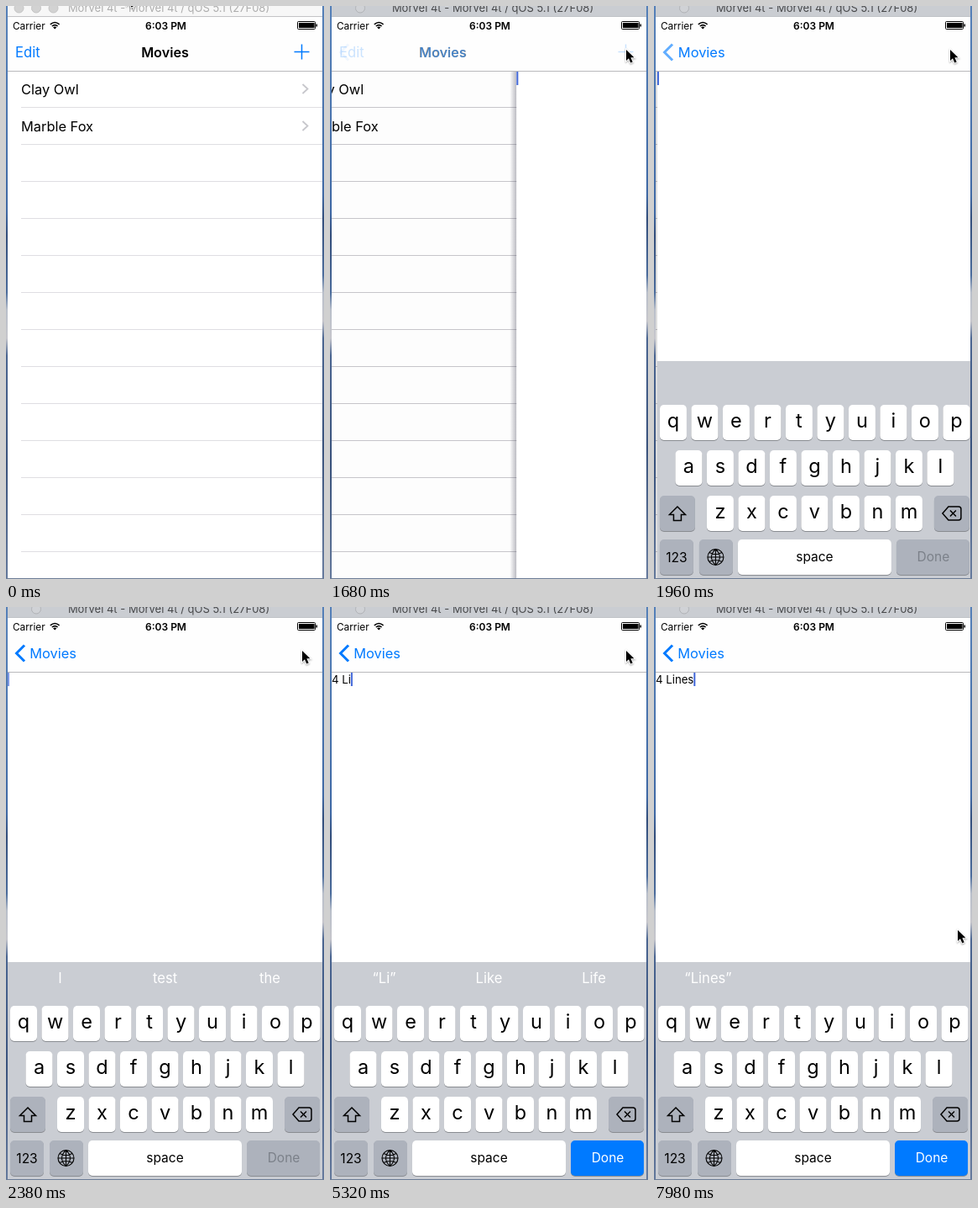
An HTML page with a canvas that plays this animation: 379 by 681 pixels, repeating every 8 s.

```html
<!DOCTYPE html>
<html lang="en">
<head>
<meta charset="utf-8">
<title>Movie list</title>
<style>
  html, body { margin: 0; width: 100%; height: 100%; overflow: hidden; background: #fff; }
  canvas { display: block; }
</style>
</head>
<body>
<canvas id="stage" width="379" height="681"></canvas>
<script>
const ctx = document.getElementById('stage').getContext('2d');
const LOOP = 8000, STEP = 70;
const LEFT = 2, RIGHT = 377, VIEW = RIGHT - LEFT, BOTTOM = 680;
const BLUE = '#007aff', PUSH = 1614, ACTIVATE = 1190;
const FONT = 'Inter, "Liberation Sans", sans-serif';

// [time, x, y] of the pointer; [time, alpha] of the caret
const POINTER = [[140, 143, -15], [560, 268, 58], [840, 350, 106], [1050, 352, 51],
                 [7630, 352, 51], [7980, 361, 383]];
const CARET = [[2310, 1], [2520, 0], [2730, 0], [2940, 1], [3290, 1], [3570, 0], [3780, 0], [3920, 1]];

// [time, text in the field, suggestions]
const TYPING = [
  [2100, '', ['I', 'test', 'the']],
  [3920, '4', ['“4”']],
  [4410, '4 ', ['minutes', 'days', 'hours']],
  [4690, '4 L', ['“L”', 'Let', 'Love']],
  [5110, '4 Li', ['“Li”', 'Like', 'Life']],
  [5530, '4 Lin', ['“Lin”', 'Line', 'Life']],
  [6020, '4 Linr', ['“Linr”']],
  [6300, '4 Linrs', ['“Linrs”']],
  [6860, '4 Linr', ['“Linr”']],
  [7070, '4 Lin', ['“Lin”']],
  [7420, '4 Line', ['“Line”']],
  [7700, '4 Lines', ['“Lines”']]
];

const clamp = v => Math.max(0, Math.min(1, v));

function along(points, t) {
  if (t <= points[0][0]) return points[0].slice(1);
  for (let i = 1; i < points.length; i++) {
    const a = points[i - 1], b = points[i];
    if (t <= b[0]) {
      const k = (t - a[0]) / (b[0] - a[0]);
      return a.slice(1).map((v, j) => v + (b[j + 1] - v) * k);
    }
  }
  return points[points.length - 1].slice(1);
}

function rect(x, y, w, h, color) {
  ctx.fillStyle = color;
  ctx.fillRect(x, y, w, h);
}

function text(str, x, y, size, color, align = 'left', weight = 400) {
  ctx.font = `${weight} ${size}px ${FONT}`;
  ctx.textAlign = align;
  ctx.fillStyle = color;
  ctx.fillText(str, x, y);
}

function stroke(path, color, width) {
  ctx.strokeStyle = color;
  ctx.lineWidth = width;
  ctx.stroke(new Path2D(path));
}

function faded(alpha, draw) {
  ctx.save();
  ctx.globalAlpha *= clamp(alpha);
  draw();
  ctx.restore();
}

function desktop() {
  [[0, 0], [RIGHT, -0.03]].forEach(([x, shift]) => {
    const g = ctx.createLinearGradient(0, 0, 0, 681);
    [[0.03, '#5580b8'], [0.36, '#3f69a5'], [0.4, '#334e7b'], [0.5, '#4b6c9c'], [0.53, '#b9bfca'],
     [0.58, '#c6c6cc'], [0.61, '#4a6591'], [0.8, '#39527c'], [1, '#64799c']]
      .forEach(([at, color]) => g.addColorStop(at + shift, color));
    rect(x, 0, 2, 681, g);
  });
  rect(0, BOTTOM, 379, 1, '#6b7c96');
}

function movieList(t, progress) {
  const active = t >= ACTIVATE;
  ctx.save();
  ctx.translate(-0.3 * VIEW * progress, 0);
  ['Clay Owl', 'Marble Fox'].forEach((name, i) => {
    const y = 105 + 44 * i;
    text(name, 18, y, 16.4, '#000');
    stroke(`M353.5 ${y - 12}l6 5.5l-6 5.5`, '#c7c7cc', 1.8);
  });
  for (let y = 120; y < BOTTOM; y += 44) rect(18, y, 500, 1, active ? '#c8c7cc' : '#dfdee2');
  ctx.restore();
  rect(LEFT, 78, VIEW, BOTTOM - 78, `rgba(0,0,0,${0.13 * progress ** 3})`);
}

function key(x, y, w, fill = '#fff') {
  [['#898c91', 1], [fill, 0]].forEach(([color, dy]) => {
    ctx.fillStyle = color;
    ctx.beginPath();
    ctx.roundRect(x, y + dy, w, 42, 5);
    ctx.fill();
  });
}

function keyboard(t, entry) {
  const GREY = '#adb2bc';
  rect(LEFT, 422, VIEW, BOTTOM - 422, '#cacdd3');
  if (entry) {
    faded((t - entry[0] + STEP) / 210, () => entry[2].forEach((word, i) =>
      text(word, 64.5 + 125 * i, 447, 16.6, '#fff', 'center')));
  }
  [['qwertyuiop', 5, 474], ['asdfghjkl', 23.5, 528], ['zxcvbnm', 61, 582]].forEach(([row, x0, y]) =>
    [...row].forEach((letter, i) => {
      const x = x0 + 37.5 * i;
      key(x, y, 32);
      text(letter, x + 16, y + 27, 23.5, '#000', 'center');
    }));
  key(5, 582, 42, GREY);
  stroke('M26 595l9.5 9.5h-5v7h-9v-7h-5z', '#000', 1.5);
  key(332, 582, 42, GREY);
  stroke('M349 595h12q3 0 3 3v10q0 3-3 3h-12l-7-8zM351 599.5l7 7m0-7l-7 7', '#000', 1.5);

  key(5, 634, 40, GREY);
  text('123', 25, 660.5, 15.5, '#000', 'center');
  key(52, 634, 40, GREY);
  stroke('M62 655a9.5 9.5 0 1 0 19 0a9.5 9.5 0 1 0-19 0h19M71.5 645.5v19' +
         'M71.5 645.5q-10 9.5 0 19q10-9.5 0-19M64 649.5q7.5 4 15 0M64 660.5q7.5-4 15 0', '#000', 1.1);
  key(98, 634, 183);
  text('space', 189.5, 660, 15.5, '#000', 'center');
  const enabled = entry && entry[1];
  key(287, 634, 87, enabled ? BLUE : GREY);
  text('Done', 331, 660, 15.5, enabled ? '#fff' : '#7b8089', 'center');
}

function editor(t, offset) {
  const entry = TYPING.filter(e => e[0] <= t).pop();
  const value = entry ? entry[1] : '';
  ctx.save();
  ctx.translate(offset, 0);
  const shadow = ctx.createLinearGradient(LEFT - 8, 0, LEFT, 0);
  shadow.addColorStop(0, 'rgba(60,60,80,0)');
  shadow.addColorStop(1, `rgba(60,60,80,${0.35 * clamp(offset / 150)})`);
  rect(LEFT - 8, 78, 8, BOTTOM - 78, shadow);
  rect(LEFT, 78, VIEW, BOTTOM - 78, '#fff');
  text(value, 2, 90.5, 13.2, '#000');
  const caretX = LEFT + ctx.measureText(value).width;
  faded(along(CARET, t)[0], () => rect(caretX, 77, 2, 17, '#4066d8'));
  if (t >= 1750) keyboard(t, entry);
  ctx.restore();
}

function navigationBar(t, progress) {
  const rest = 1 - progress;
  rect(LEFT, 13, VIEW, 64, '#fefefe');
  rect(LEFT, 77, VIEW, 1, '#b9b9bc');

  faded(rest ** 3, () => {
    text('Edit', 11, 61, 16.6, BLUE);
    stroke('M343.5 54.5h18M352.5 45.5v18', BLUE, 1.5);
  });
  const x = 56 + 133.5 * rest, blend = clamp(progress * 1.35);
  faded(1 - blend, () => text('Movies', x, 61, 16.2, '#000', 'center', 600));
  faded(blend, () => text('Movies', x, 61, 16.4, BLUE, 'center'));
  faded((t - 1650) / 500, () => stroke('M22 45.5l-9.5 9.5l9.5 9.5', BLUE, 3));
}

function statusBar() {
  text('Carrier', 8, 27.5, 11.8, '#000');
  stroke('M52.8 21.8q5.4-4.6 10.8 0M54.8 24q3.4-2.8 6.8 0', '#000', 1.6);
  ctx.fillStyle = '#000';
  ctx.fill(new Path2D('M56 25.3q2.2-1.6 4.4 0l-2.2 2.3z'));
  text('6:03 PM', 190.5, 27.5, 12, '#000', 'center', 600);
  stroke('M348.5 18.5h19q1 0 1 1v7q0 1-1 1h-19q-1 0-1-1v-7q0-1 1-1z', '#000', 1);
  rect(349, 20, 18.5, 6, '#000');
  rect(369.5, 21.5, 1.5, 3, '#000');
}

function titleBar(t) {
  const active = t >= ACTIVATE;
  rect(LEFT, 0, VIEW, 13, active ? '#cacdd2' : '#f7f7f7');
  rect(LEFT, 12, VIEW, 1, active ? '#c0c3c8' : '#c4c4c6');
  for (const x of active ? [36] : [15.5, 36, 56.5]) {
    ctx.beginPath();
    ctx.arc(x, 2.5, 5.5, 0, 7);
    ctx.fillStyle = active ? '#d0d2d6' : '#d2d2d2';
    ctx.fill();
    ctx.strokeStyle = active ? '#b0b2b6' : '#c4c4c4';
    ctx.lineWidth = 1;
    ctx.stroke();
  }
  text('Morvel 4t - Morvel 4t / qOS 5.1 (27F08)', 194, 7, 13, active ? '#48494b' : '#adadad', 'center');
}

function pointer(t) {
  const [x, y] = along(POINTER, t);
  ctx.save();
  ctx.translate(x, y);
  ctx.lineJoin = 'miter';
  ctx.shadowColor = 'rgba(0,0,0,.35)';
  ctx.shadowBlur = 2;
  ctx.shadowOffsetY = 1;
  const arrow = 'M1 1v13l3-2.8l2.3 5.3l2.4-1l-2.3-5.2h4.1z';
  stroke(arrow, '#fff', 2);
  ctx.shadowColor = 'transparent';
  ctx.fillStyle = '#000';
  ctx.fill(new Path2D(arrow));
  ctx.restore();
}

function render(t) {
  // critically damped spring for the push transition
  const s = Math.max(0, t - PUSH) * 0.0214;
  const progress = 1 - (1 + s) * Math.exp(-s);

  rect(0, 0, 379, 681, '#fff');
  desktop();
  ctx.save();
  ctx.beginPath();
  ctx.rect(LEFT, 0, VIEW, BOTTOM);
  ctx.clip();
  movieList(t, progress);
  if (t > PUSH) editor(t, VIEW * (1 - progress));
  navigationBar(t, progress);
  statusBar();
  titleBar(t);
  ctx.restore();
  pointer(t);
}

function tick() {
  const now = performance.now() % LOOP;
  render(Math.floor(now / STEP) * STEP);
  requestAnimationFrame(tick);
}
tick();
</script>
</body>
</html>
```
